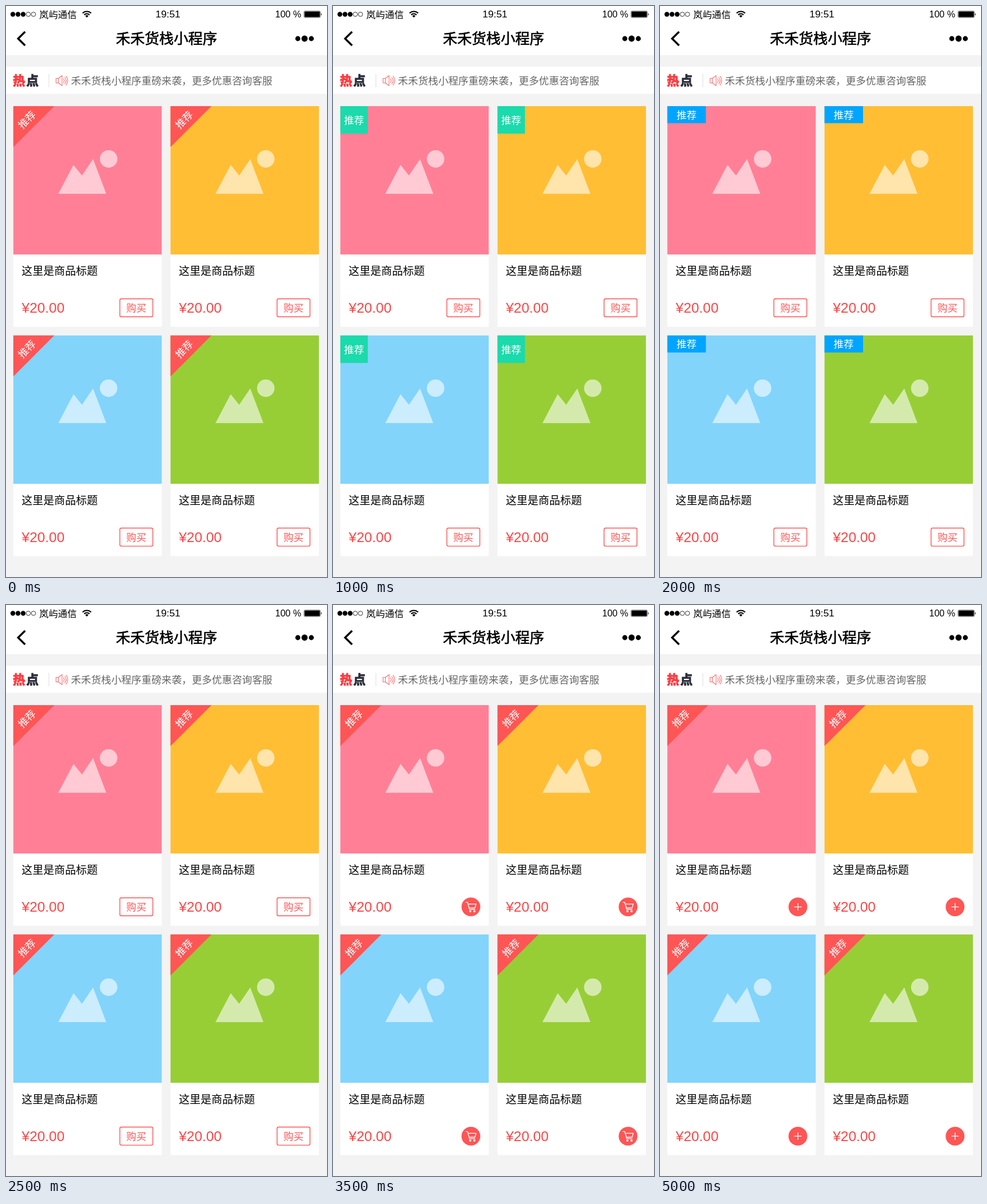
Animation of 561 by 998 pixels, one loop 5500 ms. Source, as an HTML page:

```html
<!DOCTYPE html>
<html lang="zh-CN">
<head>
<meta charset="utf-8">
<title>小程序商品列表</title>
<style>
html, body { margin: 0; width: 100%; height: 100%; overflow: hidden; background: #f3f3f3; }
svg { display: block; width: 100%; height: 100%; }
text { font-family: "Noto Sans CJK SC", "Noto Sans CJK", sans-serif; }
.latin { font-family: "Liberation Sans", Arial, sans-serif; }
.line { fill: none; stroke: #ff5555; stroke-width: 1.4; }
.white { fill: none; stroke: #fff; stroke-width: 1.4; }

/* Eleven slots of 500 ms; --at is the slot in which a part appears. */
.one, .six, .seven {
  visibility: hidden;
  animation: one 5500ms step-end infinite;
  animation-delay: calc((var(--at) - 11) * 500ms);
}
.six { animation-name: six; }
.seven { animation-name: seven; }
@keyframes one { 0% { visibility: visible } 9.0909%, 100% { visibility: hidden } }
@keyframes six { 0% { visibility: visible } 54.5454%, 100% { visibility: hidden } }
@keyframes seven { 0% { visibility: visible } 63.6363%, 100% { visibility: hidden } }
</style>
</head>
<body>
<svg viewBox="0 0 561 998" preserveAspectRatio="none">
  <rect width="561" height="998" fill="#f3f3f3"/>
  <rect width="561" height="86" fill="#fff"/>
  <rect y="106" width="561" height="47.5" fill="#fff"/>

  <!-- status bar -->
  <g>
    <circle cx="12" cy="14.5" r="4.2"/><circle cx="21" cy="14.5" r="4.2"/><circle cx="30" cy="14.5" r="4.2"/>
    <g fill="none" stroke="#000" stroke-width=".8"><circle cx="39" cy="14.5" r="3.8"/><circle cx="48" cy="14.5" r="3.8"/></g>
    <text x="58" y="20.6" font-size="16.4">岚屿通信</text>
    <path d="M133.8 12.6a10.6 10.6 0 0 1 15 0M136.6 15.5a6.6 6.6 0 0 1 9.4 0" fill="none" stroke="#000" stroke-width="2.1"/>
    <path d="M141.3 20.2l-2.8-2.9a4 4 0 0 1 5.6 0z"/>
    <text class="latin" x="283" y="20.4" font-size="17.4" text-anchor="middle">19:51</text>
    <text class="latin" x="470.5" y="20.3" font-size="16">100 %</text>
    <rect x="520.6" y="8.6" width="29" height="11.8" rx="2" fill="#fff" stroke="#777" stroke-width=".8"/>
    <rect x="521.6" y="9.6" width="27" height="9.8" rx="1"/>
    <path d="M550.6 12.2q2.4 2.3 0 4.6z"/>
  </g>

  <!-- title bar -->
  <path d="M33.4 45L21.2 57L33.4 69" fill="none" stroke="#000" stroke-width="3.4"/>
  <text x="280.5" y="66.4" font-size="25.3" stroke="#000" stroke-width=".6" text-anchor="middle">禾禾货栈小程序</text>
  <circle cx="510" cy="57" r="4.4"/><circle cx="521.8" cy="57" r="5.4"/><circle cx="533.6" cy="57" r="4.4"/>

  <!-- notice -->
  <g font-size="21.5" font-weight="900" stroke-width="1">
    <text x="12" y="138" fill="#ff3b40" stroke="#ff3b40">热</text>
    <text x="35.5" y="138" fill="#2c2f3a" stroke="#2c2f3a">点</text>
  </g>
  <path d="M75 118.5V142" stroke="#ddd"/>
  <g fill="none" stroke="#ff6b6b" stroke-width="1.1" stroke-linejoin="round" stroke-linecap="round">
    <path d="M87.5 126.5h4l6.5-4.8v17.6l-6.5-4.8h-4zM91.5 126.5v8"/>
    <path d="M100.5 127.4q2.6 3.1 0 6.2M102.8 125q4.6 5.5 0 11M105 122.7q6 7.8 0 15.6"/>
  </g>
  <text x="113.5" y="137" font-size="17.6" fill="#666">禾禾货栈小程序重磅来袭，更多优惠咨询客服</text>

  <g id="grid"></g>
</svg>
<script>
const red = '#ff5555';

// Two-character label centred on a point.
const label = (word, x, y, fill, turn = 0) =>
  `<text transform="translate(${x} ${y}) rotate(${turn})" y="6.6" font-size="17.5" text-anchor="middle" fill="${fill}">${word}</text>`;
const slot = (span, at, body) => `<g class="${span}" style="--at:${at}">${body}</g>`;
const tag = (x, y, turn) => label('推荐', x, y, '#fff', turn);

const badges =
  slot('seven', 5, `<path d="M0 0H71.6L0 71.6z" fill="${red}"/>` + tag(23.6, 23.8, -45)) +
  slot('one', 1, `<circle cx="24" cy="24" r="24" fill="${red}"/>` + tag(24, 24)) +
  slot('one', 2, '<rect width="48" height="48" fill="#1bdaab"/>' + tag(24, 24.4)) +
  slot('one', 3, '<path d="M28.6 0H71.6L0 71.6V28.6z" fill="#ff7200"/>' + tag(26, 26.2, -45)) +
  slot('one', 4, '<rect width="67.4" height="29.8" fill="#00a5ff"/>' + tag(33.6, 15));

const pill = 'x="186.2" y="336.7" width="57.6" height="31.6" rx="2.5"';
const buy = fill => label('购买', 215, 352.6, fill);
const disc = fill => `<circle r="16.4" fill="${fill}"/>`;
const ring = '<circle class="line" r="15.8"/>';
const plus = kind => `<path class="${kind}" d="M-6.5 0H6.5M0-6.5V6.5"/>`;
const cart = kind =>
  `<g class="${kind}" stroke-linejoin="round" stroke-linecap="round">
    <path d="M-8.6-8h2.8l3.4 12.2H7M-5-5H9L7 1.8H-3"/>
    <circle cx="-1.2" cy="7.6" r="1.2"/><circle cx="6" cy="7.6" r="1.2"/></g>`;
const round = body => `<g transform="translate(228.2 352.6)">${body}</g>`;

const buttons =
  slot('six', 0, `<rect class="line" ${pill}/>` + buy(red)) +
  slot('one', 6, `<rect ${pill} fill="${red}" stroke="${red}" stroke-width="1.4"/>` + buy('#fff')) +
  slot('one', 7, round(disc(red) + cart('white'))) +
  slot('one', 8, round(ring + cart('line'))) +
  slot('one', 9, round(ring + plus('line'))) +
  slot('one', 10, round(disc(red) + plus('white')));

const card = (color, i) =>
  `<g transform="translate(${12.8 + i % 2 * 274.7} ${175 + (i >> 1) * 400.8})">
    <rect width="259.4" height="385.6" fill="#fff"/>
    <rect width="259.4" height="259.3" fill="${color}"/>
    <g fill="#fff" opacity=".59">
      <path d="M78.6 153.2L105.2 102.8L120 121.2L139.4 92.6L162.4 153.2z"/>
      <circle cx="166.5" cy="92.2" r="15.3"/>
    </g>
    <text x="14.4" y="295.2" font-size="19">这里是商品标题</text>
    <text class="latin" x="14.8" y="361.4" font-size="24.4" fill="#ff4444">¥20.00</text>
    ${badges}${buttons}
  </g>`;

document.getElementById('grid').innerHTML =
  ['#ff8096', '#ffbe34', '#82d4fb', '#97ce36'].map(card).join('');
</script>
</body>
</html>
```
